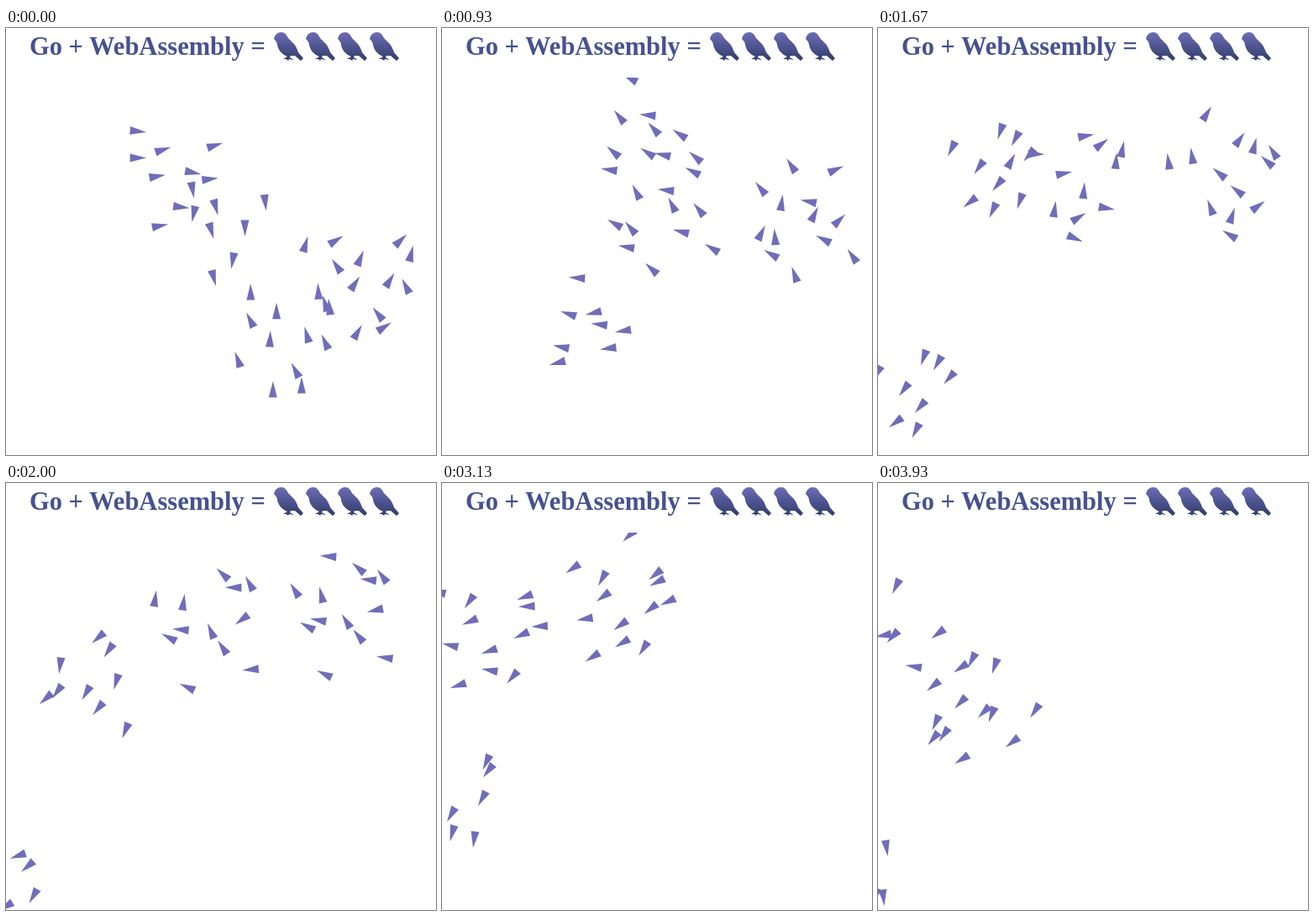
These frames come from a looping animation (512x508 px, 3990 ms). An HTML page with a canvas:

```html
<!DOCTYPE html>
<html lang="en">
<head>
<meta charset="utf-8">
<title>Flocking</title>
<style>
html, body { margin: 0; width: 100%; height: 100%; overflow: hidden; background: #fff; }
svg, canvas { position: absolute; left: 0; display: block; }
svg { top: 0; }
canvas { top: 59px; }
text { font: bold 30.5px "Liberation Serif", "Times New Roman", serif; fill: #465290; }
</style>
</head>
<body>
<svg width="512" height="59" fill="url(#dusk)">
  <defs>
    <linearGradient id="dusk" gradientUnits="userSpaceOnUse" x1="0" y1="4" x2="0" y2="39">
      <stop offset="0" stop-color="#6f6db8"/>
      <stop offset="1" stop-color="#2f3d6b"/>
    </linearGradient>
    <path id="bird" d="M319 13C320 8 323 5 328 5C332 5 334 8 336 12L343 19C346 23 347 26 348 29L354 36L351 39L344 33L339 33L338 35L343 38L337 37L336 39L334 37L330 37L335 34C328 31 324 26 323 20C323 17 321 15 319 13Z"/>
  </defs>
  <text x="28" y="32">Go + WebAssembly =</text>
  <use href="#bird"/>
  <use href="#bird" x="38"/>
  <use href="#bird" x="76"/>
  <use href="#bird" x="114"/>
</svg>
<canvas id="sky" width="512" height="449"></canvas>
<script>
const LOOP = 3990, STEPS = 60;
const KEYS = [0, 7, 20, 30, 39, 47, 59];   // steps at which a flock passes its waypoints
const GOLDEN = Math.PI * (3 - Math.sqrt(5));

const flocks = [
  { size: 9, radius: 62, route: '195,172 284,160 180,118 95,235 65,318 15,370 -20,490' },
  { size: 12, radius: 74, route: '330,365 309,261 227,192 243,161 145,140 60,175 -10,180' },
  { size: 13, radius: 72, route: '430,300 437,260 423,202 405,150 307,130 217,145 110,272' },
  { size: 8, radius: 54, route: '258,238 260,342 95,376 0,490 -60,510 -150,540 -300,560' }
];

// Smooth curve through the waypoints of one axis.
function curve(points) {
  const last = KEYS.length - 1;
  const slopes = points.map((_, i) => {
    const a = Math.max(i - 1, 0), b = Math.min(i + 1, last);
    return (points[b] - points[a]) / (KEYS[b] - KEYS[a]);
  });
  return step => {
    let i = 0;
    while (i < last - 1 && step >= KEYS[i + 1]) i++;
    const span = KEYS[i + 1] - KEYS[i];
    const u = (step - KEYS[i]) / span, v = 1 - u;
    return v * v * ((1 + 2 * u) * points[i] + u * span * slopes[i]) +
      u * u * ((1 + 2 * v) * points[i + 1] - v * span * slopes[i + 1]);
  };
}

for (const flock of flocks) {
  const points = flock.route.split(' ').map(p => p.split(',').map(Number));
  flock.x = curve(points.map(p => p[0]));
  flock.y = curve(points.map(p => p[1]));
}

// Birds fill a slowly turning disc evenly, each swaying in its own rhythm.
function position({ x, y, size, radius }, k, step) {
  const turn = k * GOLDEN + step * 0.02;
  const reach = radius * Math.sqrt((k + 0.5) / size);
  const sway = step * 0.33 + k * 5;
  return [
    x(step) + reach * Math.cos(turn) + 13 * Math.cos(sway),
    y(step) + reach * Math.sin(turn) + 13 * Math.sin(sway * 0.9)
  ];
}

const ctx = document.getElementById('sky').getContext('2d');
ctx.fillStyle = '#706db9';

function drawBird(flock, k, step) {
  const [x, y] = position(flock, k, step);
  const [nextX, nextY] = position(flock, k, step + 0.01);
  ctx.setTransform(1, 0, 0, 1, x, y - 59);
  ctx.rotate(Math.atan2(nextY - y, nextX - x));
  ctx.beginPath();
  ctx.moveTo(10, 0);
  ctx.lineTo(-9.5, -5);
  ctx.lineTo(-9.5, 5);
  ctx.fill();
}

function draw(time) {
  const step = Math.floor(time % LOOP / LOOP * STEPS);
  ctx.setTransform(1, 0, 0, 1, 0, 0);
  ctx.clearRect(0, 0, 512, 449);
  for (const flock of flocks)
    for (let k = 0; k < flock.size; k++) drawBird(flock, k, step);
}

const begin = performance.now();
function tick() {
  draw(performance.now() - begin);
  requestAnimationFrame(tick);
}
tick();
</script>
</body>
</html>
```
